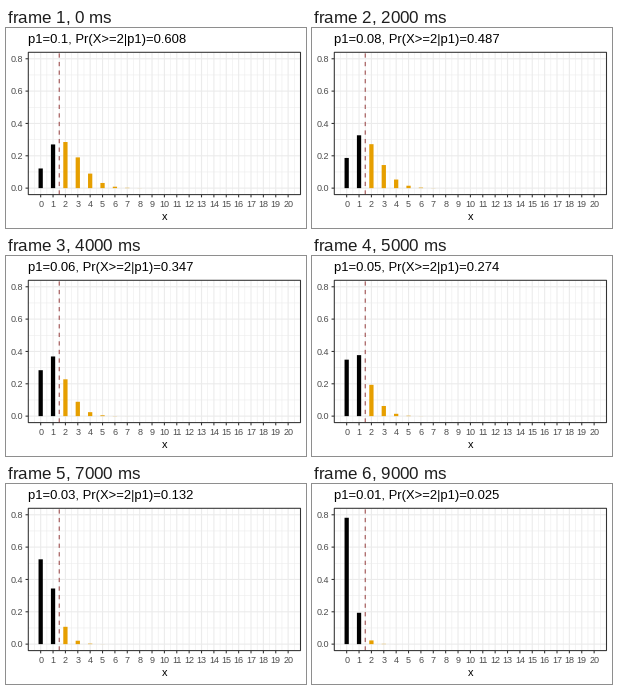
A matplotlib script that plays this animation: 300x200 px, repeating every 10000 ms.

```python
import math

import matplotlib.pyplot as plt
from matplotlib.animation import FuncAnimation
from matplotlib.patches import Rectangle

plt.rcParams.update({"font.family": "Liberation Sans", "path.snap": False,
                     "toolbar": "None"})

W, H, DPI = 300, 200, 72          # at 72 dpi a point equals a pixel
LEFT, RIGHT, TOP, BOTTOM = 22.3, 294.5, 24.3, 166.6
N, CUT, Y_MAX = 20, 2, 0.8
STEPS, P_START, P_STEP = 10, 0.1, 0.00975
LINE = 1.07
GRID, DARK, LABEL = "#ebebeb", "#333333", "#4d4d4d"
BLACK, ORANGE = "#000000", "#e69f00"


def px(x):
    return LEFT + (x + 0.05 * N) / (1.1 * N) * (RIGHT - LEFT)


def py(y):
    return BOTTOM - (y / Y_MAX + 0.05) / 1.1 * (BOTTOM - TOP)


def pmf(k, p):
    return math.comb(N, k) * p**k * (1 - p) ** (N - k)


fig = plt.figure(figsize=(W / DPI, H / DPI), dpi=DPI, facecolor="white")
ax = fig.add_axes([0, 0, 1, 1])
ax.set_xlim(0, W)
ax.set_ylim(H, 0)
ax.axis("off")


def line(x0, y0, x1, y1, color, lw=LINE, z=1, **kw):
    return ax.plot([x0, x1], [y0, y1], color=color, lw=lw, zorder=z,
                   solid_capstyle="butt", dash_capstyle="butt", **kw)[0]


def vline(x, color, lw=LINE, z=1, **kw):
    line(px(x), BOTTOM, px(x), TOP, color, lw, z, **kw)


def hline(y, lw=LINE, z=1):
    line(LEFT, py(y), RIGHT, py(y), GRID, lw, z)


# Grid
for i in range(N + 2):
    vline(i - 0.5, GRID, LINE / 2)
for i in range(4):
    hline(0.1 + 0.2 * i, LINE / 2)
for i in range(N + 1):
    vline(i, GRID, z=2)
for i in range(5):
    hline(0.2 * i, z=2)

# Ticks and labels
for i in range(N + 1):
    line(px(i), BOTTOM, px(i), BOTTOM + 2.75, DARK)
    ax.text(px(i), 179, str(i), size=9, color=LABEL, ha="center", va="baseline")
for i in range(5):
    y = py(0.2 * i)
    line(LEFT - 2.75, y, LEFT, y, DARK)
    ax.text(LEFT - 4.95, y + 3.2, f"{0.2 * i:.1f}", size=9, color=LABEL,
            ha="right", va="baseline")
ax.text((LEFT + RIGHT) / 2, 192, "x", size=11, color="black",
        ha="center", va="baseline")

bars = [line(px(k), py(0), px(k), py(0), BLACK if k < CUT else ORANGE, 4.27, 3)
        for k in range(N + 1)]
vline(CUT - 0.5, "#9c4a4a", z=4, linestyle=(0, (4, 4)))
ax.add_patch(Rectangle((LEFT, TOP), RIGHT - LEFT, BOTTOM - TOP, fill=False,
                       ec=DARK, lw=LINE, zorder=5))
title = ax.text(LEFT, 15, "", size=13, color="black", va="baseline")


def update(i):
    p = P_START - P_STEP * i
    probs = [pmf(k, p) for k in range(N + 1)]
    for bar, q in zip(bars, probs):
        bar.set_ydata([py(0), py(q)])
    tail = 1 - sum(probs[:CUT])
    title.set_text(f"p1={round(p, 2):g}, Pr(X>={CUT}|p1)={round(tail, 3):g}")
    return [*bars, title]


anim = FuncAnimation(fig, update, frames=STEPS, interval=1000, repeat=True,
                     repeat_delay=0, blit=False)
plt.show()
```
